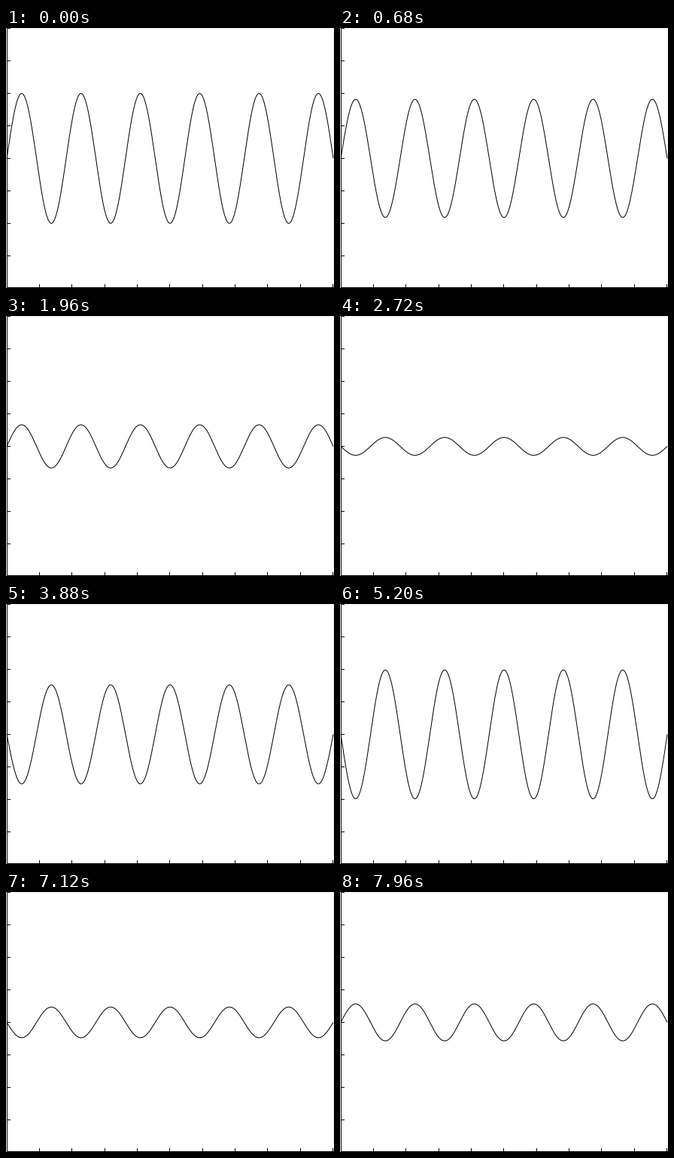
Recreate the animation shown at these times as a matplotlib script. Size 436 by 344 pixels, loop 8000 ms.

```python
import numpy as np
import matplotlib.pyplot as plt
from matplotlib.animation import FuncAnimation
from matplotlib.patches import Rectangle

W, H, DPI = 436, 344, 100
FRAMES, STEP_MS = 200, 40
PERIOD_MS = 10000
LEFT, RIGHT = 1.1, 435.0
MID, UNIT = 172.5, 85.9
WAVES = 5.5
TICK = 4

plt.rcParams["toolbar"] = "None"
fig = plt.figure(figsize=(W / DPI, H / DPI), dpi=DPI, facecolor="white")
ax = fig.add_axes([0, 0, 1, 1])
ax.set_xlim(0, W)
ax.set_ylim(H, 0)
ax.axis("off")


def bar(x, y, w, h, color="black"):
    ax.add_patch(Rectangle((x, y), w, h, fc=color, ec="none", lw=0,
                           antialiased=False))


# Pale box edges at the top and right, black axes at the left and bottom
bar(1, 0, W - 1, 1, "#ececec")
bar(W - 1, 0, 1, H, "#ececec")
bar(1, 0, 1, H)
bar(1, H - 1, W - 1, 1)

for k in range(1, 11):
    x = int(1 + 43.36 * k)
    bar(x, H - 1 - TICK, 1, TICK)
for k in range(8):
    y = int(0.6 + 42.95 * k)
    bar(1, y, 1 + TICK, 1)

xs = np.linspace(LEFT, RIGHT, 600)
shape = np.sin(2 * np.pi * WAVES * (xs - LEFT) / (RIGHT - LEFT))
wave, = ax.plot(xs, MID - UNIT * shape, color="black", lw=72 / DPI,
                solid_capstyle="butt", solid_joinstyle="round", snap=False)


def update(i):
    amp = UNIT * np.cos(2 * np.pi * i * STEP_MS / PERIOD_MS)
    wave.set_ydata(MID - amp * shape)
    return wave,


anim = FuncAnimation(fig, update, frames=FRAMES, interval=STEP_MS,
                     repeat=True, repeat_delay=0, blit=False)
plt.show()
```
